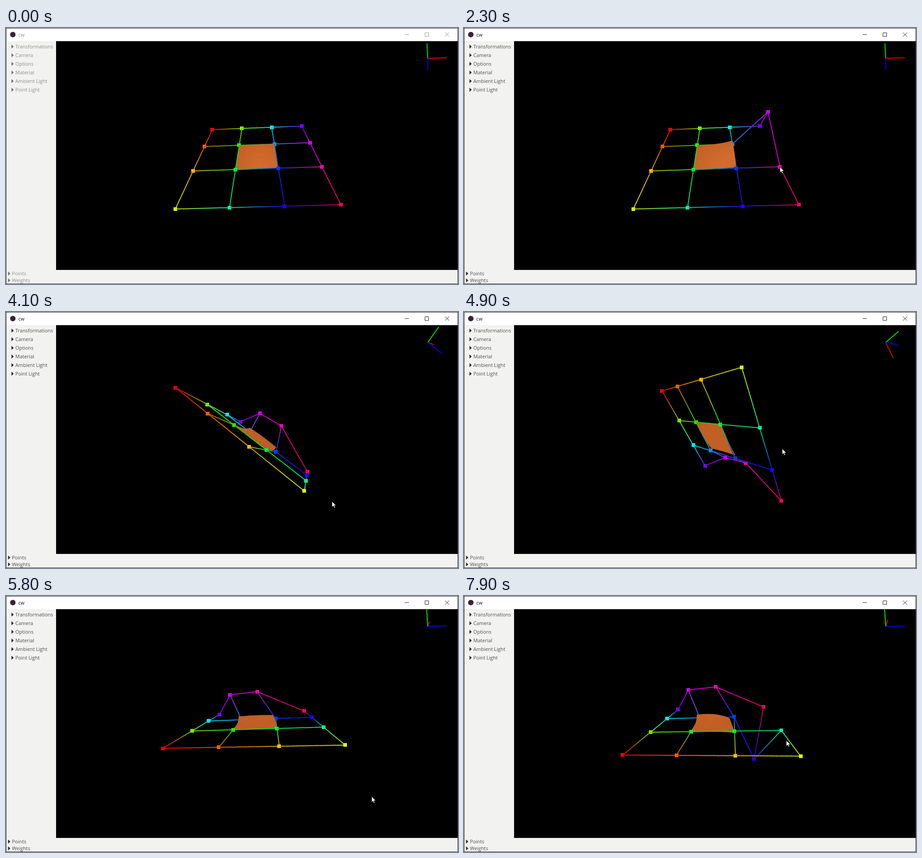
An HTML page with a canvas that plays this animation: 993 by 564 pixels, repeating every 8000 ms.

```html
<!DOCTYPE html>
<html lang="en">
<head>
<meta charset="utf-8">
<title>cw</title>
<style>
html, body { margin: 0; width: 993px; height: 564px; overflow: hidden; background: #f2f2f1; }
svg, canvas { position: absolute; display: block; }
svg { left: 0; top: 0; }
canvas { left: 110px; top: 29px; background: #000; }
text { font: 10.8px "Open Sans", "Noto Sans", sans-serif; fill: #8d8f8f; }
.arrow { fill: #747474; }
.button { fill: none; stroke: #999; }
.active text { fill: #505050; }
.active .title { fill: #111; }
.active .arrow { fill: #2c2c2c; }
.active .button { stroke: #222; }
</style>
</head>
<body>
<svg id="window" width="993" height="564">
  <rect x=".5" y=".5" width="992" height="563" fill="#f2f2f1" stroke="#333"/>
  <rect x="1" y="1" width="991" height="28" fill="#fff"/>
  <circle cx="15" cy="14.5" r="6" fill="#3a2038"/>
  <text class="title" x="27" y="19">cw</text>
  <path class="button" d="M876 14.5h9M920.5 10.5h8v8h-8ZM964.5 10l9 9m0-9l-9 9"/>
  <g id="menu"></g>
</svg>
<canvas id="view" width="882" height="504"></canvas>
<script>
const LOOP = 8000, STEP = 100, FOCUS_TIME = 400;
const SIZE = 4, CELLS = 14, PIECES = 14;
const FOCAL = 333.6, DISTANCE = 3.925, CENTER = [551, 281];
const GIZMO = [926.5, 67], GIZMO_SIZE = 42;
const LIGHT = [0, 2.7, 0];
const ENTRY = [860, 430];
const HOME = [-1.8, 38.4, -3.1]; // yaw, pitch, roll in degrees

// Each gesture either grabs a control point or turns the view to a pose.
const gestures = [
  { from: 1300, to: 1900, grab: 13, by: [0, -68] },
  { from: 2500, to: 3200, grab: 14, by: [-1, -90], swing: -75 },
  { from: 3900, to: 4100, pose: [70.5, 5.8, 35.4], start: [553, 435], by: [163, -18] },
  { from: 4400, to: 4900, pose: [31, -26.9, 49.2], by: [-17, -116] },
  { from: 4900, to: 5400, pose: [89.5, -10.2, -2], by: [117, 95] },
  { from: 5400, to: 5900, pose: [82.5, 20.6, -3.8], by: [-16, 57] },
  { from: 6700, to: 7600, grab: 11, by: [-36, 95], swing: 100 },
  { from: 8100, to: 8200, start: [708, 318], by: [0, 0] }
];

const view = document.getElementById('view');
const ctx = view.getContext('2d');
const frame = document.getElementById('window');

const clamp = k => Math.max(0, Math.min(1, k));
const easeOut = k => 1 - (1 - k) ** 3;
const dot = (a, b) => a.reduce((sum, v, i) => sum + v * b[i], 0);
const add = (a, b, k = 1) => a.map((v, i) => v + b[i] * k);
const mix = (a, b, k) => a.map((v, i) => v + (b[i] - v) * k);
const unit = a => a.map(v => v / Math.hypot(...a));
const cross = (a, b) => [
  a[1] * b[2] - a[2] * b[1], a[2] * b[0] - a[0] * b[2], a[0] * b[1] - a[1] * b[0]
];
const rgb = c => `rgb(${c.map(Math.round)})`;
const progress = (g, t) => clamp((t - g.from) / (g.to - g.from));

// pointer movement since the gesture began
function travel(g, t) {
  const k = progress(g, t);
  return [g.by[0] * k, g.by[1] * k + (g.swing || 0) * Math.sin(Math.PI * k * k)];
}

function rotate(p, i, j, angle) {
  const out = [...p], c = Math.cos(angle), s = Math.sin(angle);
  out[i] = p[i] * c + p[j] * s;
  out[j] = p[j] * c - p[i] * s;
  return out;
}

function axesAt(t) {
  const pose = gestures.filter(g => g.pose)
    .reduce((from, g) => mix(from, g.pose, progress(g, t)), HOME);
  const [yaw, pitch, roll] = pose.map(a => a * Math.PI / 180);
  return [[1, 0, 0], [0, 1, 0], [0, 0, 1]].map(axis =>
    rotate(rotate(rotate(axis, 0, 2, yaw), 2, 1, pitch), 0, 1, roll));
}

const toView = (axes, p) => axes.reduce((sum, axis, i) => add(sum, axis, p[i]), [0, 0, 0]);
const toObject = (axes, v) => axes.map(axis => dot(axis, v));
const scaleAt = v => FOCAL / (DISTANCE - v[2]);
const project = v => [CENTER[0] + v[0] * scaleAt(v), CENTER[1] - v[1] * scaleAt(v)];

function controlPoints(t) {
  const points = Array.from({ length: SIZE * SIZE },
    (_, k) => [Math.floor(k / SIZE) - 1.5, 0, k % SIZE - 1.5]);
  for (const g of gestures.filter(g => g.grab && t > g.from)) {
    const axes = axesAt(g.from);
    const scale = scaleAt(toView(axes, points[g.grab]));
    const [dx, dy] = travel(g, t);
    points[g.grab] = add(points[g.grab], toObject(axes, [dx, -dy, 0]), 1 / scale);
  }
  return points;
}

function planPointer() {
  let position = ENTRY, time = FOCUS_TIME;
  for (const g of gestures) {
    g.idle = { from: time, to: Math.max(time + 1, g.from - 200), start: position };
    if (g.grab) g.start = project(toView(axesAt(g.from), controlPoints(g.from)[g.grab]));
    g.start = g.start || position;
    position = add(g.start, g.by);
    time = g.to;
  }
}

function pointerAt(t) {
  const g = gestures.find(g => t < g.to);
  if (t >= g.from) return add(g.start, travel(g, t));
  return mix(g.idle.start, g.start, easeOut(progress(g.idle, t)));
}

// uniform cubic B-spline weights
const basis = u => [
  (1 - u) ** 3, 3 * u ** 3 - 6 * u * u + 4, -3 * u ** 3 + 3 * u * u + 3 * u + 1, u ** 3
].map(w => w / 6);

function surfacePoint(points, u, v) {
  const bu = basis(u), bv = basis(v);
  return points.reduce(
    (sum, p, k) => add(sum, p, bu[Math.floor(k / SIZE)] * bv[k % SIZE]), [0, 0, 0]);
}

// evenly spaced hues
const colors = Array.from({ length: SIZE * SIZE }, (_, k) => [0, 8, 4].map(n => {
  const h = (n + k * 12 / (SIZE * SIZE)) % 12;
  return 255 * (.5 - .5 * Math.max(-1, Math.min(h - 3, 9 - h, 1)));
}));

function shade(corners, middle) {
  const eye = unit(add([0, 0, DISTANCE], middle, -1));
  let normal = unit(cross(add(corners[2], corners[0], -1), add(corners[3], corners[1], -1)));
  if (dot(normal, eye) < 0) normal = normal.map(v => -v);
  const half = unit(add(eye, unit(add(LIGHT, middle, -1))));
  const shine = Math.max(0, dot(normal, half)) ** 40;
  return rgb(add([196, 97, 38], [16, 12, 8], shine));
}

function line(a, b, color) {
  ctx.strokeStyle = color;
  ctx.lineWidth = 2;
  ctx.beginPath();
  ctx.moveTo(...a);
  ctx.lineTo(...b);
  ctx.stroke();
}

function polygon(points, color) {
  ctx.fillStyle = ctx.strokeStyle = color;
  ctx.lineWidth = .7;
  ctx.beginPath();
  points.forEach(p => ctx.lineTo(...p));
  ctx.closePath();
  ctx.fill();
  ctx.stroke();
}

function addEdge(items, points, a, b) {
  for (let i = 0; i < PIECES; i++) {
    const from = mix(points[a], points[b], i / PIECES);
    const to = mix(points[a], points[b], (i + 1.1) / PIECES);
    const color = rgb(mix(colors[a], colors[b], (i + .5) / PIECES).map(c => c * .85));
    items.push({ z: (from[2] + to[2]) / 2, draw: () => line(project(from), project(to), color) });
  }
}

function addSurface(items, points) {
  const grid = Array.from({ length: CELLS + 1 }, (_, i) =>
    Array.from({ length: CELLS + 1 }, (_, j) => surfacePoint(points, i / CELLS, j / CELLS)));
  for (let i = 0; i < CELLS; i++) for (let j = 0; j < CELLS; j++) {
    const corners = [grid[i][j], grid[i + 1][j], grid[i + 1][j + 1], grid[i][j + 1]];
    const middle = mix(corners[0], corners[2], .5);
    items.push({ z: middle[2], draw: () => polygon(corners.map(project), shade(corners, middle)) });
  }
}

function addHandle(items, p, color) {
  const [x, y] = project(p);
  items.push({ z: p[2], draw: () => {
    ctx.fillStyle = rgb(color);
    ctx.fillRect(Math.round(x - 4), Math.round(y - 4), 8, 8);
  } });
}

function drawGizmo(axes) {
  ['#e00000', '#00e000', '#0000e0']
    .map((color, i) => ({ color, axis: axes[i] }))
    .sort((a, b) => a.axis[2] - b.axis[2])
    .forEach(({ color, axis }) =>
      line(GIZMO, add(GIZMO, [axis[0], -axis[1]], GIZMO_SIZE), color));
}

function drawPointer([x, y]) {
  ctx.save();
  ctx.translate(x, y);
  ctx.fillStyle = '#fff';
  ctx.strokeStyle = '#000';
  ctx.lineWidth = 1;
  const shape = new Path2D('M0 0V13L3 10.3L5 15L7.2 14L5.2 9.5H9.2Z');
  ctx.fill(shape);
  ctx.stroke(shape);
  ctx.restore();
}

function render(t) {
  const active = t >= FOCUS_TIME;
  frame.classList.toggle('active', active);
  ctx.setTransform(1, 0, 0, 1, -110, -29);
  ctx.clearRect(110, 29, view.width, view.height);

  const axes = axesAt(t);
  const points = controlPoints(t).map(p => toView(axes, p));
  const items = [];
  addSurface(items, points);
  points.forEach((p, k) => {
    if (k % SIZE < SIZE - 1) addEdge(items, points, k, k + 1);
    if (k + SIZE < points.length) addEdge(items, points, k, k + SIZE);
    addHandle(items, p, colors[k]);
  });
  items.sort((a, b) => a.z - b.z).forEach(item => item.draw());

  drawGizmo(axes);
  if (active) drawPointer(pointerAt(t));
}

function menuItem(label, x, y) {
  return `<path class="arrow" d="M${x} ${y - 4.5}l5 4.5l-5 4.5Z"/>` +
    `<text x="${x + 8.5}" y="${y + 4}">${label}</text>`;
}

document.getElementById('menu').innerHTML =
  ['Transformations', 'Camera', 'Options', 'Material', 'Ambient Light', 'Point Light']
    .map((label, i) => menuItem(label, 12, 41 + 19 * i)).join('') +
  ['Points', 'Weights'].map((label, i) => menuItem(label, 4.5, 541 + 15 * i)).join('');

planPointer();
const begin = performance.now();
let shown = -1;
function tick() {
  const elapsed = Math.max(0, performance.now() - begin) % LOOP;
  const t = Math.floor(elapsed / STEP) * STEP;
  if (t !== shown) render(shown = t);
  requestAnimationFrame(tick);
}
tick();
</script>
</body>
</html>
```
